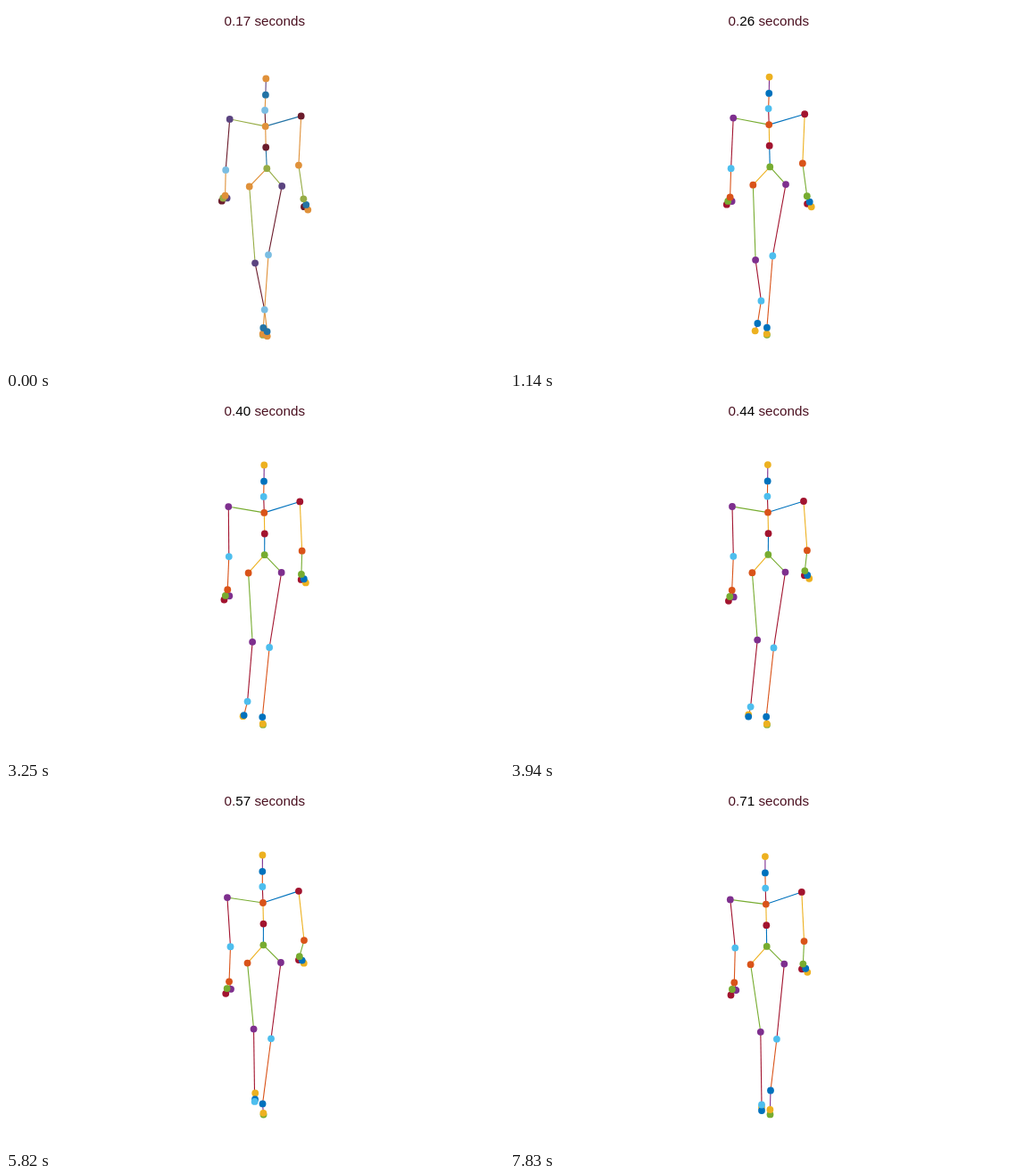
Write an HTML page that moves like this. It is 558 by 406 pixels and loops after 8 s.

```html
<!DOCTYPE html>
<html lang="en">
<head>
<meta charset="utf-8">
<title>Walking skeleton</title>
<style>
  html, body { margin: 0; width: 100%; height: 100%; overflow: hidden; background: #fff; }
  svg { display: block; width: 558px; height: 406px; }
  text { font: 15.2px "Liberation Sans", Arial, sans-serif; text-anchor: middle; white-space: pre; fill: #4a1020; }
</style>
</head>
<body>
<svg viewBox="0 0 558 406">
  <g id="bones" stroke-width="1.1"></g>
  <g id="dots"></g>
  <text x="289.8" y="22">0.<tspan id="digits"></tspan> seconds</text>
</svg>
<script>
const LOOP = 8000, STEP = 122.2, LAST = 64, RATE = 120, FIRST_SAMPLE = 21;

const VIVID = { blue: '#0072bd', orange: '#d95319', yellow: '#edb120', purple: '#7e2f8e',
  green: '#77ac30', sky: '#4dbeee', red: '#a2142f' };
const MUTED = { blue: '#2373a5', orange: '#e0913a', yellow: '#e0913a', purple: '#5b4480',
  green: '#96ac45', sky: '#7abde2', red: '#6b1c2c' };

const $ = id => document.getElementById(id);
const joints = {};

function shape(group, tag) {
  return $(group).appendChild(document.createElementNS('http://www.w3.org/2000/svg', tag));
}
function set(node, attrs) {
  for (const key in attrs) node.setAttribute(key, attrs[key]);
}

// Motions are functions of the progress u, from 0 to 1.
// curve: smooth line through evenly spaced values.
function curve(...v) {
  const n = v.length - 1;
  const slope = i => i === 0 ? (n > 1 ? 1.5 * (v[1] - v[0]) - (v[2] - v[0]) / 4 : v[1] - v[0])
    : i === n ? (n > 1 ? 1.5 * (v[n] - v[n - 1]) - (v[n] - v[n - 2]) / 4 : v[1] - v[0])
    : (v[i + 1] - v[i - 1]) / 2;
  return u => {
    const i = Math.min(n - 1, Math.floor(u * n)), t = u * n - i, r = 1 - t;
    return v[i] * r * r * (1 + 2 * t) + v[i + 1] * t * t * (3 - 2 * t)
      + t * r * (slope(i) * r - slope(i + 1) * t);
  };
}
// swing: the forward and back sway of the right arm.
const swing = (middle, reach) => u => middle + reach * Math.cos(2 * Math.PI * (u - 0.05) / 1.34);
// lift: slow drift of the planted foot, then the heel comes up.
const lift = (from, drift, rise) => u => from + drift * u + rise * u ** 6;

// x and y are constants or motions, measured from the joint named in base.
function joint(name, parent, color, boneColor, base, x, y) {
  const motion = m => typeof m === 'number' ? () => m : m;
  const bone = parent && shape('bones', 'line');
  const dot = shape('dots', 'circle');
  $('dots').prepend(dot);
  joints[name] = { parent, color, boneColor, base, bone, dot, moveX: motion(x), moveY: motion(y) };
}

// Torso and head
joint('neck', '', 'orange', '', '', curve(290.7, 289, 286.8), curve(134.9, 130.6, 132.6));
joint('chest', 'neck', 'red', 'yellow', 'neck', 0.5, 23.6);
joint('pelvis', 'chest', 'green', 'blue', 'neck', curve(1.6, 0.3, 0.9), 47.3);
joint('throat', 'neck', 'sky', 'red', 'neck', -0.6, -18);
joint('face', 'throat', 'blue', 'orange', 'neck', curve(0.2, -0.9), -35.2);
joint('crown', 'face', 'yellow', 'purple', 'neck', curve(0.6, -0.9), -53.5);

// Arm on the left of the stage
joint('shoulderL', 'neck', 'purple', 'green', 'neck', -40, curve(-8, -5.2));
joint('elbowL', 'shoulderL', 'sky', 'red', 'shoulderL', curve(-4.5, 1.3, 5.5), curve(57, 55.8, 54.2));
joint('wristL', 'elbowL', 'orange', 'orange', 'elbowL', curve(-0.6, -1.6, -1), curve(28.8, 38, 38.8));
joint('handL', 'wristL', 'green', 'yellow', 'wristL', -2.4, curve(2.8, 7.2, 7.6));
joint('thumbL', 'wristL', 'purple', 'red', 'handL', 4.4, curve(-0.1, 1));
joint('fingersL', 'handL', 'red', 'blue', 'handL', -1.4, curve(3.2, 6.5));

// Arm on the right
joint('shoulderR', 'neck', 'red', 'blue', 'neck', 40, curve(-11.5, -13.7));
joint('elbowR', 'shoulderR', 'orange', 'yellow', 'shoulderR', swing(1.6, -4.5), 55.2);
joint('wristR', 'elbowR', 'green', 'green', 'elbowR', swing(0.2, 5.4), swing(28, 10));
joint('handR', 'wristR', 'blue', 'orange', 'wristR', 2.9, swing(5.5, 1.1));
joint('fingersR', 'handR', 'yellow', 'purple', 'handR', 2, swing(4.4, 1.3));
joint('thumbR', 'wristR', 'red', 'sky', 'handR', curve(-2.3, -4.3), swing(0.9, 1.4));

// Leg on the left steps forward
joint('hipL', 'pelvis', 'orange', 'yellow', 'neck', curve(-18, -17.2), 67.6);
joint('kneeL', 'hipL', 'purple', 'green', 'hipL', curve(6.4, 1.9, 5.8, 7, 11.2), curve(85.8, 82.5, 75.4, 74, 75.6));
joint('ankleL', 'kneeL', 'sky', 'red', 'kneeL', curve(10.6, 3.2, -7.6, 1.1, 1.2), curve(52.3, 47, 75, 81.3, 81.7));
joint('footL', 'ankleL', 'blue', 'orange', 'ankleL', curve(2.9, -6.2, -2.4, 0.4, 0), curve(24.5, 24, 11, -2.5, 6.5));
joint('toeL', 'footL', 'yellow', 'purple', 'footL', curve(0.1, -3.4, 0, 0.2, 0), curve(5.2, 8.2, -2.2, -7, -3.5));

// Leg on the right stays planted, then pushes off
joint('hipR', 'pelvis', 'purple', 'green', 'neck', curve(18.5, 20.5), 67);
joint('kneeR', 'hipR', 'sky', 'red', 'hipR', curve(-15.2, -13, -8.4), curve(77.2, 84.8, 84.2));
joint('footR', 'kneeR', 'blue', 'orange', '', lift(288.3, -2.5, 6.2), lift(361, -2, -17.5));
joint('toeR', 'footR', 'yellow', 'purple', '', lift(287.7, 0, 3.7), lift(367.7, 0, -4.7));
joint('tipR', 'toeR', 'green', 'sky', '', lift(287.9, 0, 3.6), lift(368.9, -0.5, 0));

// Playback gains a little during the first second, then keeps an even pace.
function sampleAt(ms) {
  return Math.min(LAST, Math.floor(ms / STEP + 0.68 * Math.min(1, ms / 1000)));
}

function draw(sample) {
  const colors = sample ? VIVID : MUTED, u = sample / LAST;
  for (const j of Object.values(joints)) {
    const base = joints[j.base] || { x: 0, y: 0 };
    j.x = base.x + j.moveX(u);
    j.y = base.y + j.moveY(u);
    set(j.dot, { cx: j.x, cy: j.y, r: 3.9, fill: colors[j.color] });
    if (j.bone) {
      const from = joints[j.parent];
      set(j.bone, { x1: from.x, y1: from.y, x2: j.x, y2: j.y, stroke: colors[j.boneColor] });
    }
  }
  $('digits').textContent = ((FIRST_SAMPLE + sample) / RATE).toFixed(2).slice(2);
  set($('digits'), { fill: sample ? '#000' : '#4a1020' });
}

const start = performance.now();
function tick() {
  draw(sampleAt((performance.now() - start) % LOOP));
  requestAnimationFrame(tick);
}
tick();
</script>
</body>
</html>
```
